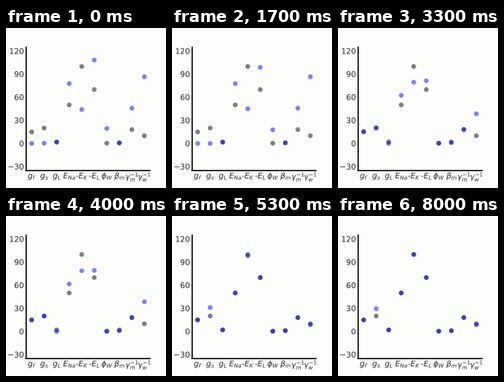
Write a matplotlib script that moves like this. It is 200 px wide and 200 px high and loops after 8300 ms.

```python
import numpy as np
import matplotlib.pyplot as plt
from matplotlib.animation import FuncAnimation
from matplotlib.patches import PathPatch
from matplotlib.textpath import TextPath
from matplotlib.transforms import Affine2D

FRAMES, INTERVAL = 83, 100
STEPS_PER_FRAME = 0.3  # the fit advances three times a second
PAPER = "#fcfefc"
EM = 9.72  # text size in pixels
PAD = 2.5

LABELS = ["$g_f$", "$g_s$", "$g_L$", "$E_{Na}$", "-$E_K$", "-$E_L$",
          r"$\phi_W$", r"$\beta_m$", r"$\gamma_m^{-1}$", r"$\gamma_w^{-1}$"]
GF, GS, GL, ENA, EK, EL, PHI, BETA, GM, GW = range(10)

TRUE = [15, 20, 2, 50, 100, 70, 0.3, 1, 18, 10]
START = [0, 0.3, 1.5, 77.7, 44, 108.3, 19.5, 0.5, 45.8, 86.6]

# Estimates that change at each step of the fit
UPDATES = {
    3: {PHI: 18.3},
    4: {EK: 45, EL: 107.3, PHI: 18},
    5: {GS: 0, EL: 98.8, PHI: 17.7},
    6: {EL: 97, PHI: 17.2, GM: 45.5},
    7: {EL: 96},
    8: {GF: 18.5, GS: 29.4, GL: 0, ENA: 95.4, EK: 77.7, EL: 84.2,
        PHI: 0.5, BETA: 0.3, GM: 31, GW: 70},
    9: {GF: 15.6, GS: 21.5, ENA: 62.5, EK: 79.5, EL: 82.4,
        PHI: 0.3, BETA: 2, GM: 19.5, GW: 38.6},
    10: {GS: 20.3, EL: 81.4, GM: 18.3},
    11: {GF: 15, ENA: 62, EL: 80.3, GM: 18},
    12: {GS: 20, ENA: 61.6, EK: 78.8, EL: 79.3},
    13: {GS: 30.5, GL: 2, ENA: 50.4, EK: 97.8, EL: 70.6, BETA: 1, GW: 7.6},
    14: {GS: 30.8, ENA: 50, EL: 70, GW: 8.3},
    15: {EK: 98, GW: 8.6},
    16: {GS: 31, EK: 98.3},
    18: {GS: 30.2, EK: 99.3, GW: 8.4},
    19: {GS: 29.5, EK: 100, GW: 8.6},
}


def estimate(step):
    values = list(START)
    for when, changes in UPDATES.items():
        if when <= step:
            for index, value in changes.items():
                values[index] = value
    return values


def add_text(path, x, y):
    """Place an outlined label with its origin at a pixel position."""
    fig.add_artist(PathPatch(path, facecolor="0.15", linewidth=0, snap=False,
                             transform=Affine2D().translate(x, y)))


def label_x(value, text):
    path = TextPath((0, 0), text, size=EM)
    box = path.get_extents()
    x, bottom = ax.transData.transform((value, ax.get_ylim()[0]))
    ascent = max(0.76 * EM, box.y1)
    add_text(path, x - (box.x0 + box.x1) / 2, bottom - PAD - ascent)


def label_y(value):
    path = TextPath((0, 0), str(value).replace("-", "\u2212"), size=EM)
    left, y = ax.transData.transform((ax.get_xlim()[0], value))
    right = path.get_extents().x1 + 0.066 * EM
    add_text(path, left - PAD - right, y - 0.365 * EM)


fig, ax = plt.subplots(figsize=(2, 2), dpi=100, facecolor=PAPER)
ax.set_facecolor(PAPER)
x = np.arange(len(LABELS))
# One size per point keeps the dots at fractional pixel positions
dots = dict(s=np.full(len(x), 18), alpha=0.5, linewidths=0)
ax.scatter(x, TRUE, color="black", **dots)
fit = ax.scatter(x, START, color="blue", **dots)

ax.set(xlim=(-0.45, 9.45), ylim=(-35, 125), xticks=[], yticks=[])
ax.spines[["top", "right"]].set_visible(False)
for side, shift in (("left", -0.18), ("bottom", 0.18)):
    spine = ax.spines[side]
    spine.set_position(("outward", shift))
    spine.set_linewidth(1.08)
    spine.set_snap(False)

for i, text in enumerate(LABELS):
    label_x(i, text)
for tick in range(-30, 121, 30):
    label_y(tick)


def draw(frame):
    step = int((frame + 0.5) * STEPS_PER_FRAME)
    fit.set_offsets(np.column_stack([x, estimate(step)]))
    return [fit]


anim = FuncAnimation(fig, draw, frames=FRAMES, interval=INTERVAL,
                     repeat=True, repeat_delay=0)
plt.show()
```
